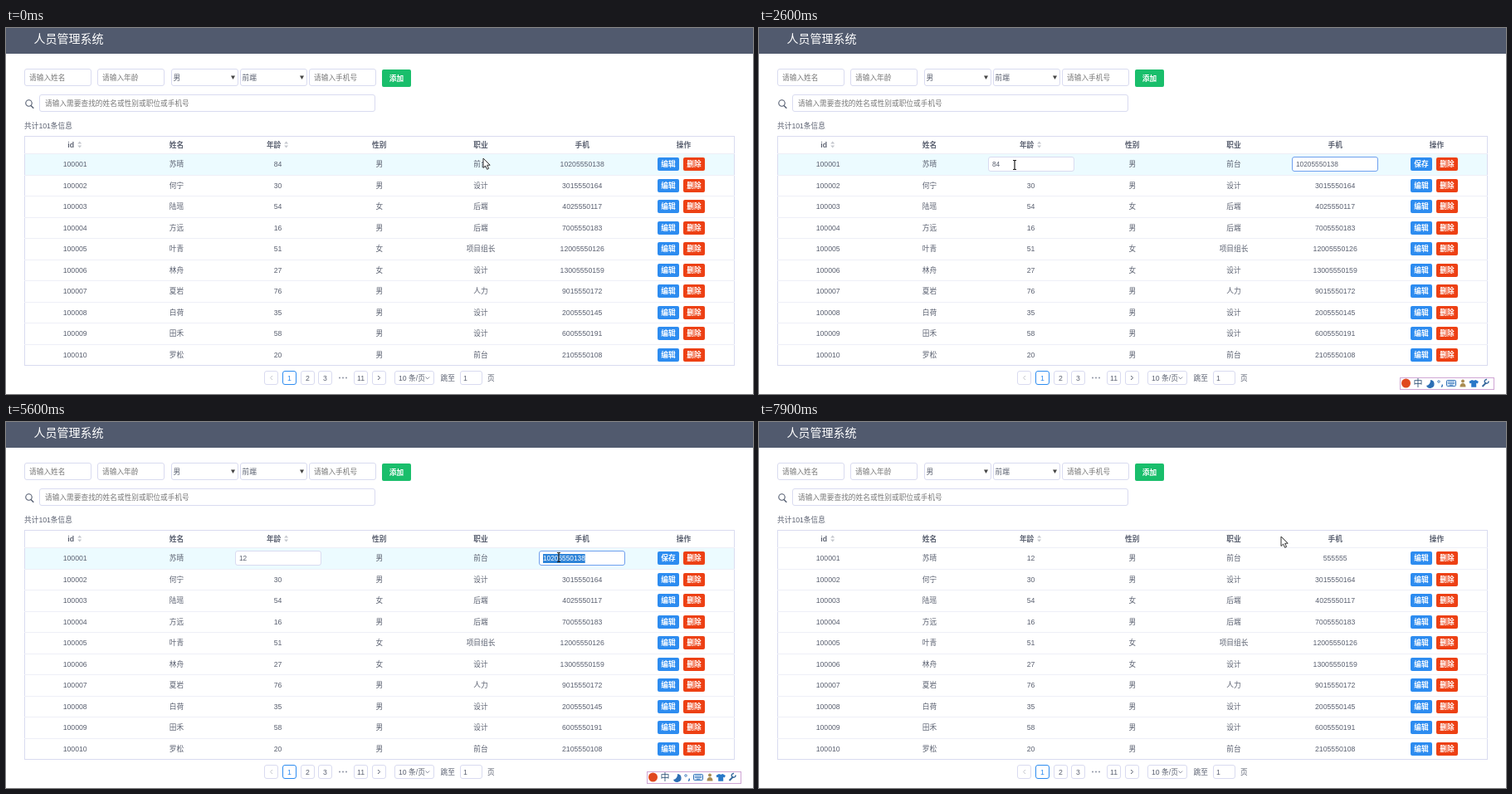
These frames come from a looping animation (900 px wide and 441 px high, 8 s). An HTML page:

```html
<!DOCTYPE html>
<html lang="zh-CN">
<head>
<meta charset="utf-8">
<title>人员管理系统</title>
<style>
html, body { margin: 0; width: 100%; height: 100%; overflow: hidden; background: #fff; }
svg { display: block; width: 900px; height: 441px; }
text { font-family: "Liberation Sans", "Noto Sans CJK SC", "Noto Sans CJK", sans-serif; white-space: pre; }
</style>
</head>
<body>
<svg viewBox="0 0 900 441"><g id="page"></g><g id="live"></g></svg>
<script>
const BLUE = '#2d8cf0', RED = '#ed4014', INK = '#5a6070', HINT = '#777', LINE = '#d9dbf0', ROW_H = 25.56;
const colX = i => 83.2 + 122.2 * i;
const rowY = i => Math.round(164 + ROW_H * i);

const people = [
  ['苏晴', 84, '男', '前台', '10205550138'],
  ['何宁', 30, '男', '设计', '3015550164'],
  ['陆瑶', 54, '女', '后端', '4025550117'],
  ['方远', 16, '男', '后端', '7005550183'],
  ['叶青', 51, '女', '项目组长', '12005550126'],
  ['林舟', 27, '女', '设计', '13005550159'],
  ['夏岩', 76, '男', '人力', '9015550172'],
  ['白荷', 35, '男', '设计', '2005550145'],
  ['田禾', 58, '男', '设计', '6005550191'],
  ['罗松', 20, '男', '前台', '2105550108'],
];
const newAge = '12', newPhone = '555555';

// y is the vertical middle of the text
const text = (x, y, s, { fill = INK, size = 8.7, anchor = 'start', weight = 400 } = {}) =>
  `<text x="${x}" y="${y + size * 0.36}" fill="${fill}" font-size="${size}" text-anchor="${anchor}" font-weight="${weight}">${s}</text>`;
const mid = (x, y, s, o) => text(x, y, s, { anchor: 'middle', ...o });
const rect = (x, y, w, h, fill, stroke = 'none', r = 0) =>
  `<rect x="${x}" y="${y}" width="${w}" height="${h}" rx="${r}" fill="${fill}" stroke="${stroke}"/>`;
const path = (d, stroke, fill = 'none', width = 1) =>
  `<path d="${d}" stroke="${stroke}" fill="${fill}" stroke-width="${width}" stroke-linejoin="round"/>`;
const box = (x, y, w, h, stroke = LINE) => rect(x + .5, y + .5, w - 1, h - 1, '#fff', stroke, 2.5);
const button = (x, y, w, h, s, fill) =>
  rect(x, y, w, h, fill, 'none', 2) + mid(x + w / 2, y + h / 2, s, { fill: '#fff', weight: 700 });
const hLine = y => path(`M22 ${Math.round(y) + .5}H878`, '#eeeff7');

function cells(i, [name, age, sex, job, phone]) {
  return [100001 + i, name, age, sex, job, phone]
    .map((s, c) => s === '' ? '' : mid(colX(c), rowY(i), s)).join('');
}
function actions(i, label = '编辑', fill = BLUE) {
  const y = rowY(i) - 8;
  return button(785, y, 26, 16, label, fill) + button(816, y, 26, 16, '删除', RED);
}
function sorter(x) {
  return path(`M${x - 2.5} 139.5l2.5 -3l2.5 3zM${x - 2.5} 141.5l2.5 3l2.5 -3z`, 'none', '#c5c8ce');
}

function drawPage() {
  let s = rect(0, 0, 900, 31, '#515a6e') + text(33.5, 13, '人员管理系统', { fill: '#fff', size: 14 });
  [[22, '请输入姓名'], [110, '请输入年龄'], [365, '请输入手机号']].forEach(([x, hint]) =>
    s += box(x, 49, 81, 21) + text(x + 6, 59.5, hint, { fill: HINT }));
  [[199, '男'], [282, '前端']].forEach(([x, v]) =>
    s += box(x, 49, 81, 21) + text(x + 2.5, 59.5, v) + path(`M${x + 72} 57.5h5l-2.5 4.5z`, 'none', '#444'));
  s += button(453, 50, 35, 21, '添加', '#19be6b');
  s += '<circle cx="27.5" cy="90.5" r="3.7" fill="none" stroke="#515a6e" stroke-width="1.1"/>' + path('M30 93.5l3.3 3.3', '#515a6e', 'none', 1.3);
  s += box(40, 80, 405, 21) + text(47, 90.5, '请输入需要查找的姓名或性别或职位或手机号', { fill: HINT });
  s += text(22, 118, '共计101条信息');

  s += rect(22.5, 130.5, 855, 276, '#fff', LINE);
  const bold = { weight: 700 };
  ['id', '姓名', '年龄', '性别', '职业', '手机', '操作'].forEach((h, i) => {
    const sorts = i === 0 || i === 2;
    s += mid(colX(i) - (sorts ? 5 : 0), 141, h, bold);
    if (sorts) s += sorter(colX(i) + (i ? 10 : 5.5));
  });
  people.forEach((p, i) => {
    s += hLine(151 + ROW_H * i);
    if (i) s += cells(i, p) + actions(i);
  });

  [[311, ''], [333, 1], [355, 2], [376, 3], [419, 11], [441, '']].forEach(([x, n]) => {
    const now = n === 1;
    s += box(x, 413, 17, 17, now ? BLUE : LINE) + mid(x + 8.5, 421.5, n, { fill: now ? BLUE : INK });
  });
  s += path('M321 419l-2.5 2.5l2.5 2.5', '#c5c8ce') + path('M448 419l2.5 2.5l-2.5 2.5', INK);
  [402, 406, 410].forEach(x => s += `<circle cx="${x}" cy="421.5" r="1" fill="#8d93a3"/>`);
  s += box(468, 413, 48, 17) + text(473, 421.5, '10 条/页') + path('M505.5 420.5l2.3 2.3l2.3 -2.3', '#808695');
  s += text(523.5, 421.5, '跳至') + box(547, 413, 27, 17) + text(551, 421.5, '1') + text(580, 421.5, '页');
  return s;
}

function inputBar() {
  const c = '#2e6fb5';
  return rect(772.5, 421.5, 113, 14, '#fff', '#cfa6d4') +
    '<circle cx="779.5" cy="428" r="5.5" fill="#e0481f"/>' +
    mid(794, 428, '中', { fill: '#2f5277', size: 11, weight: 500 }) +
    path('M809 424a5 5 0 1 1 -5 7a6 6 0 0 0 5 -7z', 'none', c) +
    `<circle cx="819" cy="426" r="1.3" fill="none" stroke="${c}" stroke-width=".8"/>` +
    path('M823 429.5q1 2 -1 3', c, 'none', 1.3) +
    rect(828.5, 424.5, 11, 7, '#dcebfa', c, 1) + path('M830 426.7h8M830 428.5h8M832 430.2h4', c, 'none', .8) +
    '<circle cx="848" cy="425.5" r="2" fill="#a98b52"/>' + path('M844.5 432.5q0 -4.5 3.5 -4.5t3.5 4.5z', 'none', '#a98b52') +
    path('M859 424l-3.5 2l1.2 2.5l1.5 -.7v5h6v-5l1.5 .7l1.2 -2.5l-3.5 -2q-2 1.5 -4.4 0z', 'none', '#2878c8') +
    path('M871.5 432l4.5 -4.5', '#386a9d', 'none', 2) + path('M879 425.5a2.4 2.4 0 1 1 -2 -2', '#386a9d', 'none', 1.5);
}

// Pointer hot spot: time, x, y
const route = [
  [0, 575, 157], [300, 632, 124], [600, 700, 128], [1000, 763, 151.5], [1300, 795, 165], [1500, 795, 165],
  [1800, 690, 164], [2100, 690, 164], [2600, 308, 165], [2800, 308, 165], [3100, 277, 165],
  [3700, 336, 167], [4000, 336, 167], [4800, 690, 164], [5200, 666, 163], [6500, 666, 163],
  [7000, 793, 167], [7300, 793, 167], [7700, 655, 130], [7900, 629, 138], [8000, 629, 138],
];
function pointerAt(t) {
  const i = route.findIndex(k => k[0] > t), [t0, x0, y0] = route[i - 1], [t1, x1, y1] = route[i];
  const u = (t - t0) / (t1 - t0), e = u * u * (3 - 2 * u);
  return [x0 + (x1 - x0) * e, y0 + (y1 - y0) * e];
}
const shapes = {
  arrow: path('M0 0V11.5L2.6 9L4.6 13.3L6.6 12.4L4.7 8.2H8.2Z', '#333', '#fff'),
  beam: path('M-2 -5.5h1.5l.5 .6l.5 -.6h1.5M0 -5V5M-2 5.5h1.5l.5 -.6l.5 .6h1.5', '#222', 'none', 1.2),
  hand: path('M-1 0q1.2 -1 2 .4V5l1.5 -.4l.6 .8l1.5 -.2l.6 .8l1.6 .2q.6 2.5 -.8 5V13.5h-6V11.5L-3.8 7.2q.4 -1.5 2 -.2l.8 .8z', '#222', '#fff'),
};

const EDIT = 1400, PHONE = 1800, AGE = 2700, PHONE_AGAIN = 4900, PRESS = 7200, SAVE = 7300;
const typed = (s, t, start, step) => s.slice(0, Math.max(0, Math.floor((t - start) / step) + 1));

function field(col, value, focused, selected, caret) {
  const x = Math.round(colX(col) - 52), y = 155;
  const w = value.length * 4.61;
  let s = box(x, y, 104, 18, focused ? '#6f9fee' : LINE);
  if (selected) s += rect(x + 5, 159, w, 11, '#2f84d8');
  s += text(x + 5, 164, value, { size: 8.3, fill: selected ? '#fff' : INK });
  if (caret) s += path(`M${x + 5.7 + w} 159v10`, '#222', 'none', .9);
  return s;
}

function drawLive(t) {
  const [x, y] = pointerAt(t), editing = t >= EDIT && t < SAVE, saved = t >= SAVE;
  const inRow = y > 152 && y < 177.5;
  const onButton = inRow && x > 785 && x < 811 && y > 156 && y < 172;
  const [name, age, sex, job, phone] = people[0];
  let s = inRow ? rect(23, 152, 854, 25, '#ecfbff') : '';
  s += cells(0, [name, editing ? '' : saved ? newAge : age, sex, job, editing ? '' : saved ? newPhone : phone]);
  s += actions(0, editing ? '保存' : '编辑', onButton ? '#57a3f3' : BLUE);
  let onField = false;
  if (editing) {
    const onAge = t >= AGE && t < PHONE_AGAIN, onPhone = t >= PHONE && !onAge;
    const ageText = t < 3300 ? String(age) : typed(newAge, t, 3300, 200);
    const phoneText = t < 5800 ? phone : typed(newPhone, t, 5800, 150);
    const lastKey = [PHONE, AGE, 3300, 3500, PHONE_AGAIN, 5800, 6550].filter(k => k <= t).pop();
    const blink = (t - lastKey) % 1000 < 500;
    const ageSel = t >= 3000 && t < 3300, phoneSel = t >= 5300 && t < 5800;
    s += field(2, ageText, onAge, ageSel, onAge && !ageSel && blink);
    s += field(5, phoneText, onPhone, phoneSel, onPhone && !phoneSel && blink);
    onField = inRow && [2, 5].some(c => Math.abs(x - colX(c)) < 52);
  }
  if (t >= PHONE && t < PRESS) s += inputBar();
  const shape = onButton ? 'hand' : onField ? 'beam' : 'arrow';
  return s + `<g transform="translate(${x} ${y})">${shapes[shape]}</g>`;
}

const live = document.getElementById('live');
document.getElementById('page').innerHTML = drawPage();
const start = performance.now();
let shown = -1;
function tick(now) {
  const t = Math.floor(Math.max(0, now - start) % 8000 / 100) * 100;
  if (t !== shown) live.innerHTML = drawLive(shown = t);
  requestAnimationFrame(tick);
}
tick(start);
</script>
</body>
</html>
```
